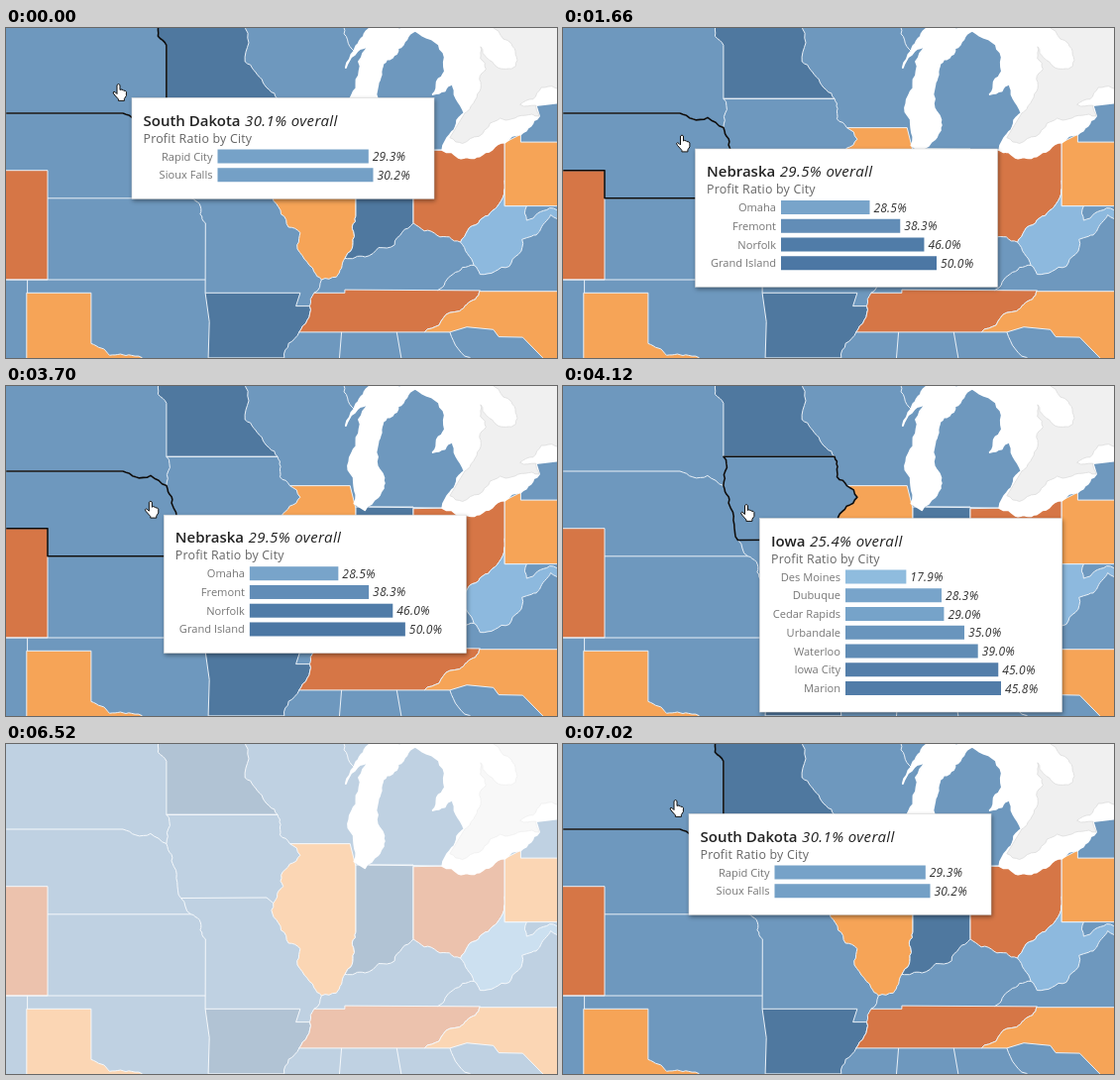
An HTML page for the animation above (8020 ms loop, 556x333 px).

```html
<!DOCTYPE html>
<html lang="en">
<head>
<meta charset="utf-8">
<title>Profit ratio map</title>
<style>
  html, body { margin: 0; width: 100%; height: 100%; overflow: hidden; background: #fff; }
  svg { display: block; width: 556px; height: 333px; font-family: "Open Sans", "Noto Sans", sans-serif; }
  .border { fill: none; stroke: #e9f0f7; stroke-linejoin: round; }
  .water { fill: #fff; stroke: #fff; stroke-width: 2; stroke-linejoin: round; }
  .abroad { fill: #f0f0f0; stroke: #dcdcdc; stroke-width: .8; }
  .hover { fill: none; stroke: #0b0b0b; stroke-width: 1.6; stroke-linejoin: round; }
  .box { fill: #fff; stroke: #d9d9d9; stroke-width: .6; filter: drop-shadow(1px 2px 2px rgba(0, 0, 0, .4)); }
  .title { font-size: 15px; fill: #222; }
  .name { font-weight: 600; }
  .overall { font-style: italic; letter-spacing: .4px; }
  .sub { font-size: 12.4px; fill: #666; letter-spacing: .2px; }
  .label { font-size: 11.1px; fill: #777; text-anchor: end; }
  .value { font-size: 12px; fill: #333; font-style: italic; letter-spacing: .2px; }
</style>
</head>
<body>
<svg viewBox="0 0 556 333">
  <rect width="556" height="333" fill="#6e98be"/>
  <g id="map"></g>
  <g id="hovers"></g>
  <g id="tips"></g>
  <path id="hand" fill="#fff" stroke="#111" stroke-linejoin="round"
    d="M4 2q1.5-2 3 0v5l1-.6 2 .6.5.6 2 .3.9 1v4l-2 3v2h-6v-1.5L1 11.5 0 9.5q1-1.5 2.5 0L4 11z"/>
  <rect id="veil" width="556" height="333" fill="#fff"/>
</svg>
<script>
const $ = id => document.getElementById(id);

function add(parent, tag, attrs, text) {
  const el = document.createElementNS('http://www.w3.org/2000/svg', tag);
  for (const k in attrs) el.setAttribute(k, attrs[k]);
  if (text) el.textContent = text;
  parent.append(el);
  return el;
}

// Mercator projection of "west,north" degrees.
const SCALE = 21.42;
const mercator = lat => Math.log(Math.tan(Math.PI / 4 + lat * Math.PI / 360)) * 180 / Math.PI;
const project = ([west, north]) =>
  [353 + (87.53 - west) * SCALE, 86 - (mercator(north) - mercator(43)) * SCALE];
const line = s => s.split(' ').map(p => project(p.split(',').map(Number)));

// Rivers and coasts: a few key points, then seeded midpoint displacement.
function noise(x, y) {
  const n = Math.sin(x * 12.9898 + y * 78.233) * 43758.5453;
  return n - Math.floor(n) - .5;
}
function bend(a, b) {
  const dx = b[0] - a[0], dy = b[1] - a[1];
  if (Math.hypot(dx, dy) < 5) return [b];
  const x = (a[0] + b[0]) / 2, y = (a[1] + b[1]) / 2, n = noise(x, y) * .3;
  const mid = [x - dy * n, y + dx * n];
  return [...bend(a, mid), ...bend(mid, b)];
}
const river = s => line(s).flatMap((p, i, all) => i ? bend(all[i - 1], p) : [p]);
const rev = e => [...e].reverse();
const path = (...edges) => 'M' + edges.flat().map(p => p.map(v => v.toFixed(1))).join('L');

const sdEast = [...river('96.9,46 96.85,45.6 96.45,45.3'), ...line('96.45,43.5')];
const sdSouth = [...line('104,43'), ...river('98.5,43 97.9,42.8 97.2,42.85 96.45,42.5')];
const bigSioux = river('96.45,43.5 96.45,42.5');
const moNorth = river('96.45,42.5 96.1,41.7 95.77,40.58');
const moMid = river('95.77,40.58 95.3,40');
const moSouth = river('95.3,40 94.9,39.8 94.61,39.1');
const mnWi = river('92.75,46 92.75,44.75 91.22,43.5');
const iaWi = river('91.22,43.5 91.1,42.8 90.64,42.5');
const iaIl = river('90.64,42.5 90.15,42.1 91.05,41.4 90.95,41 91.42,40.4');
const iaSouth = line('95.77,40.58 91.73,40.6 91.42,40.4');
const moIl = river('91.42,40.4 91.4,39.9 90.7,38.95 90.15,38.75 90.3,38.3 89.5,37.3 89.15,37');
const moKy = river('89.15,37 89.5,36.5');
const heel = line('90.15,36.5 90.35,36 89.7,36');
const moTn = river('89.5,36.5 89.7,36');
const arTn = river('89.7,36 90.2,35');
const arMs = river('90.2,35 90.9,34');
const ilKy = river('89.15,37 88.45,37.1 88.05,37.8');
const wabash = river('87.53,39.35 87.6,38.6 88.05,37.8');
const inKy = river('88.05,37.8 87.1,37.85 85.7,38.3 84.82,39.1');
const ohKy = river('84.82,39.1 83.7,38.65 82.6,38.4');
const ohWv = river('82.6,38.4 81.75,39.1 80.87,39.7 80.52,40.64');
const kyWv = river('82.6,38.4 81.97,37.54');
const kyVa = river('81.97,37.54 83.68,36.6');
const wvVa = river('81.97,37.54 81.68,37.2 80.3,37.5 79.7,38.5 78.87,38.8 78.35,39.4 77.8,39.2');
const wvMd = river('79.48,39.72 79.48,39.2 78.4,39.65 77.8,39.4');
const tnNc = river('81.68,36.59 83.1,35.75 84.3,35');
const ncSouth = line('84.3,35 83.1,35 82.3,35.2 81.05,35.1 80.8,34.82 79.67,34.8 78.6,33.9');
const txRiver = river('100,34.56 98.1,34.1 97.5,33.9');
const tnTop = line('89.5,36.5 88.05,36.5 88.05,36.62 81.68,36.59');
const erieSouth = river('83.45,41.72 82.7,41.45 81.7,41.5 80.52,41.98');
const erieEast = river('80.52,41.98 79.76,42.27 78.9,42.9');

const DARK = '#4f789f', ORANGE = '#f6a457', RED = '#d67646', PALE = '#8db9de';
const states = [
  [DARK, sdEast, rev(mnWi)],
  [RED, line('105,41 102.05,41 102.05,37 105,37')],
  [ORANGE, line('103.04,36.5 100,36.5'), txRiver, line('103.04,33.9')],
  [DARK, line('94.62,36.5'), heel, arTn, arMs, line('94.48,34 94.43,35.4')],
  [ORANGE, line('90.64,42.5 87.8,42.5 87.53,41.7 87.53,39.35'), wabash, rev(ilKy), rev(moIl), rev(iaIl)],
  [DARK, line('87.53,41.76 84.82,41.76'), rev(inKy), rev(wabash)],
  [RED, line('84.82,41.7'), erieSouth, rev(ohWv), rev(ohKy)],
  [PALE, line('80.52,40.64 80.52,39.72'), wvMd, rev(wvVa), rev(kyWv), ohWv],
  [ORANGE, line('80.52,41.98 79.76,42.27 79.76,42 77,42 77,39.72 80.52,39.72')],
  [RED, tnTop, tnNc, rev(arTn), rev(moTn)],
  [ORANGE, line('81.68,36.56 77,36.56 77,33.9'), rev(ncSouth), rev(tnNc)]
];
const borders = [
  sdSouth, bigSioux, moNorth, moMid, moSouth, iaWi, iaSouth, moKy, kyVa,
  line('96.45,43.5 91.22,43.5'), line('102.05,40 95.3,40'), line('104,37 94.62,37'),
  line('94.61,39.1 94.62,36.5'), line('103,37 103,36.5'), line('88.2,35 88.4,33'),
  line('85.6,35 85.18,33'), river('83.1,35 82,33.9'), river('90.1,46.3 88.1,45.9 87.6,45.1'),
  line('86.9,41.76 83.45,41.72')
];

// Lake Michigan with Green Bay, then the eastern lakes with the land north of them.
const michigan = river('87.6,41.88 87.88,43.04 87.5,44.15 87,45.3 88,44.55 87.6,45.1 87.05,45.75 ' +
  '86.25,45.95 84.72,45.9 84.73,45.78 85.55,45.2 86.25,44.69 86.5,43.95 86.21,42.77 86.49,42.1 87.1,41.65');
const thumb = river('84.73,45.78 83.4,45.05 83.33,44.42 83.9,43.65 82.95,44.07 82.42,43 83.1,42.25 83.45,41.72');
const ontarioSouth = line('79.05,43.27 77.9,43.37');
const abroad = river('82.4,43 81.7,43.75 81.4,44.5 81.65,45.25 80.9,44.58 80,44.6 80.2,45.35 81.5,46.1 ' +
  '77.5,46.1 77.5,43.95 78.8,43.88 79.8,43.3 79.05,43.27 78.9,42.9 80.2,42.8 81.2,42.66 82.5,41.95 83.1,42.15');

const map = $('map');
for (const [fill, ...edges] of states) add(map, 'path', { class: 'border', d: path(...edges) + 'Z', style: 'fill:' + fill });
for (const e of borders) add(map, 'path', { class: 'border', d: path(e) });
add(map, 'path', { class: 'water', d: path(michigan) + 'Z' });
add(map, 'path', { class: 'water', d: path(thumb, erieSouth, erieEast, ontarioSouth, line('77.5,47 84.73,47')) + 'Z' });
add(map, 'path', { class: 'abroad', d: path(abroad) + 'Z' });

const data = {
  sd: {
    name: 'South Dakota', overall: '30.1%', hand: [108, 55.5],
    outline: path(sdEast, bigSioux, rev(sdSouth)),
    rows: { 'Rapid City': 29.3, 'Sioux Falls': 30.2 }
  },
  ne: {
    name: 'Nebraska', overall: '29.5%', hand: [114.5, 107],
    outline: path(sdSouth, moNorth, moMid, line('102.05,40 102.05,41 104,41')),
    rows: { 'Omaha': 28.5, 'Fremont': 38.3, 'Norfolk': 46, 'Grand Island': 50 }
  },
  ia: {
    name: 'Iowa', overall: '25.4%', hand: [179.5, 118.5],
    outline: path(line('96.45,43.5'), iaWi, iaIl, rev(iaSouth), rev(moNorth), rev(bigSioux)) + 'Z',
    rows: {
      'Des Moines': 17.9, 'Dubuque': 28.3, 'Cedar Rapids': 29, 'Urbandale': 35,
      'Waterloo': 39, 'Iowa City': 45, 'Marion': 45.8
    }
  }
};

function barColor(v) {
  const t = Math.min(1, Math.max(0, (v - 18) / 30));
  const mix = (a, b) => Math.round(a + (b - a) * t);
  return `rgb(${mix(143, 76)},${mix(188, 119)},${mix(222, 164)})`;
}

for (const s of Object.values(data)) {
  s.hover = add($('hovers'), 'path', { d: s.outline, class: 'hover' });
  const g = s.tip = add($('tips'), 'g', {});
  const rows = Object.entries(s.rows), pitch = 18.75, max = Math.max(...Object.values(s.rows));
  add(g, 'rect', { class: 'box', width: 305, height: 83 + pitch * (rows.length - 1) });
  const title = add(g, 'text', { class: 'title', x: 11.5, y: 28 });
  add(title, 'tspan', { class: 'name' }, s.name);
  add(title, 'tspan', { class: 'overall', dx: 4.5 }, s.overall + ' overall');
  add(g, 'text', { class: 'sub', x: 11.5, y: 45 }, 'Profit Ratio by City');
  rows.forEach(([city, v], i) => {
    const y = 59 + pitch * i, w = 157 * v / max;
    add(g, 'text', { class: 'label', x: 81.5, y: y + 4 }, city);
    add(g, 'rect', { x: 86.5, y: y - 7, width: w, height: 14, fill: barColor(v) });
    add(g, 'text', { class: 'value', x: 90.5 + w, y: y + 4.5 }, v.toFixed(1) + '%');
  });
}

const LOOP = 8020, FADE = 6120, FULL = 7020;
const moves = [
  { from: 'sd', to: 'ne', start: 1000, span: 660, steps: 5, over: 1 },
  { from: 'ne', to: 'ia', start: 3190, span: 930, steps: 7, over: 1.28 }
];
const show = (el, on) => el.style.display = on ? '' : 'none';
const smooth = p => p * p * (3 - 2 * p);

// The hand moves in even steps, may overshoot, and settles on the last one.
function pose(t) {
  const rest = k => ({ at: data[k].hand, hover: k, tip: k });
  if (t >= FULL) return rest('sd');
  const m = moves.findLast(m => m.start <= t);
  if (!m) return rest('sd');
  const k = Math.floor((t - m.start) / m.span * m.steps + 1e-6);
  if (k >= m.steps) return rest(m.to);
  const p = (k + .5) / (m.steps - .5), s = smooth(p);
  const [ax, ay] = data[m.from].hand, [bx, by] = data[m.to].hand;
  return {
    at: [ax + (bx - ax) * s * s * m.over, ay + (by - ay) * s * m.over],
    hover: p > .75 ? m.to : m.from,
    tip: p < 1 ? m.from : m.to
  };
}

function draw(now) {
  const t = now % LOOP, fading = t >= FADE && t < FULL;
  const { at: [x, y], hover, tip } = pose(t);
  for (const k in data) {
    show(data[k].hover, !fading && k === hover);
    show(data[k].tip, !fading && k === tip);
    data[k].tip.setAttribute('transform', `translate(${x + 19} ${y + 15})`);
  }
  show($('hand'), !fading);
  $('hand').setAttribute('transform', `translate(${x} ${y})`);
  show($('veil'), fading);
  $('veil').setAttribute('opacity', Math.min(.99, 1 - Math.floor((t - FADE) / 100) / 9));
}

const start = performance.now();
function tick() {
  draw(performance.now() - start);
  requestAnimationFrame(tick);
}
tick();
</script>
</body>
</html>
```
